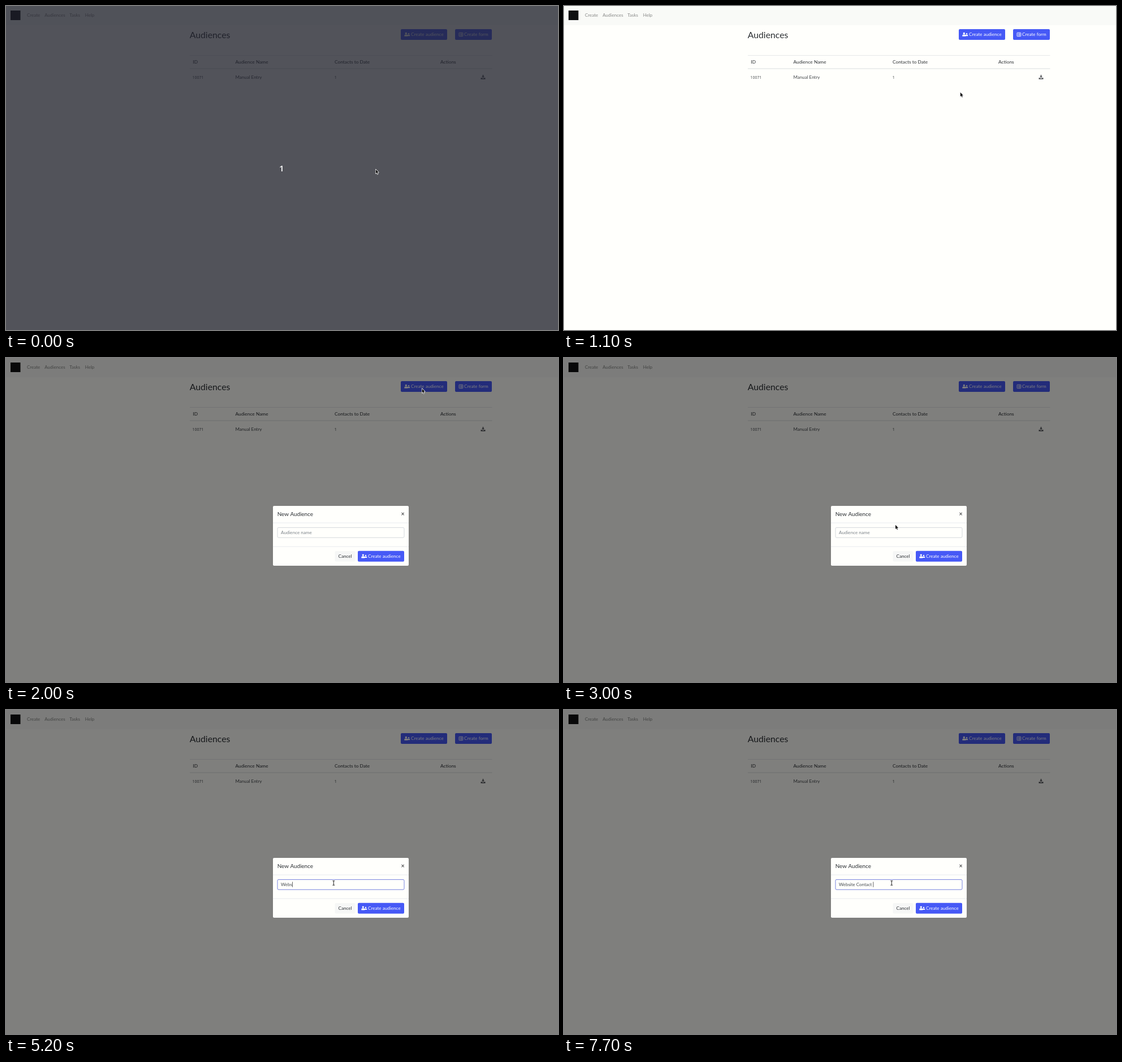
Write an HTML page with a canvas that moves like this. It is 976x574 px and loops after 8000 ms.

```html
<!DOCTYPE html>
<html lang="en">
<head>
<meta charset="utf-8">
<title>Audiences</title>
<style>
html, body { margin: 0; width: 100%; height: 100%; overflow: hidden; background: #fffffc; }
canvas { display: block; width: 976px; height: 574px; }
</style>
</head>
<body>
<canvas id="stage"></canvas>
<script>
const W = 976, H = 574, LOOP = 8000, STEP = 100;
const PAGE = '#fffffc', BLUE = '#4659f6', BLUE_HOVER = '#1b36df';
const INK = '#2b2f33', SOFT = '#44484c';
const SANS = 'Lato, "Open Sans", sans-serif';
const DIGITS = '"Open Sans", "Noto Sans", sans-serif';

const canvas = document.getElementById('stage');
const ctx = canvas.getContext('2d');
const ratio = window.devicePixelRatio || 1;
canvas.width = W * ratio;
canvas.height = H * ratio;

// Cursor path: [start, end, from, to]
const MOVES = [
  [500, 900, [653.7, 289.4], [698, 161]],
  [1000, 1600, [698, 161], [735.6, 54.3]],
  [2300, 3100, [735.6, 54.3], [579.3, 306.5]]
];

// Time at which the typed text grows to each length
const TYPED = 'Website Contact ';
const KEYS = [[4100, 1], [4400, 2], [4700, 3], [5200, 4], [5500, 7], [5700, 8], [6200, 9],
  [6500, 10], [6800, 11], [7100, 13], [7500, 15], [7700, 16]];

function rect(x, y, w, h, color) {
  ctx.fillStyle = color;
  ctx.fillRect(x, y, w, h);
}

function box(x, y, w, h, r, fill, stroke) {
  ctx.beginPath();
  ctx.roundRect(x, y, w, h, r);
  if (fill) { ctx.fillStyle = fill; ctx.fill(); }
  if (stroke) { ctx.strokeStyle = stroke; ctx.lineWidth = 0.8; ctx.stroke(); }
}

function text(str, x, y, size, color = INK, family = SANS, weight = 400) {
  ctx.font = `${weight} ${size}px ${family}`;
  ctx.fillStyle = color;
  ctx.fillText(str, x, y);
}

function poly(points) {
  ctx.beginPath();
  points.forEach(([x, y]) => ctx.lineTo(x, y));
  ctx.closePath();
}

function person(x, y, s) {
  ctx.beginPath();
  ctx.arc(x, y - 1.9 * s, 1.7 * s, 0, 7);
  ctx.fill();
  ctx.beginPath();
  ctx.roundRect(x - 3 * s, y + 0.3 * s, 6 * s, 3.2 * s, [1.8 * s, 1.8 * s, 0.5 * s, 0.5 * s]);
  ctx.fill();
}

function audienceButton(x, y, color) {
  box(x, y, 82, 19, 2, color);
  ctx.fillStyle = '#fff';
  person(x + 9.3, y + 9.3, 1);
  person(x + 14, y + 9.7, 0.75);
  text('Create audience', x + 18, y + 12.4, 8.15, '#fff');
}

function formButton(x, y) {
  box(x, y, 65, 19, 2, BLUE);
  box(x + 6.9, y + 6.3, 7, 6.4, 0.8, null, '#fff');
  for (let i = 0; i < 3; i++) {
    const ly = y + 7.6 + i * 1.6;
    rect(x + 8, ly, 0.9, 0.8, '#fff');
    rect(x + 9.6, ly, 3.3, 0.8, '#fff');
  }
  text('Create form', x + 16, y + 12.4, 8.15, '#fff');
}

function downloadIcon(x, y) {
  ctx.fillStyle = '#505357';
  poly([[x + 3.2, y], [x + 4.8, y], [x + 4.8, y + 2.7], [x + 6.6, y + 2.7],
    [x + 4, y + 5.3], [x + 1.4, y + 2.7], [x + 3.2, y + 2.7]]);
  ctx.fill();
  poly([[x, y + 5.3], [x + 2.2, y + 5.3], [x + 4, y + 6.7], [x + 5.8, y + 5.3],
    [x + 8, y + 5.3], [x + 8, y + 7.8], [x, y + 7.8]]);
  ctx.fill();
}

function drawPage(rowHover, buttonHover) {
  rect(0, 0, W, H, PAGE);
  rect(0, 0, W, 34, '#f9faf7');
  rect(8, 8, 17.5, 17, '#101113');
  [['Create', 37], ['Audiences', 68.3], ['Tasks', 112.3], ['Help', 139.7]]
    .forEach(([s, x]) => text(s, x, 19.4, 8, '#878887'));

  text('Audiences', 324.7, 56.6, 15.8);
  audienceButton(698, 41, buttonHover ? BLUE_HOVER : BLUE);
  formButton(794, 41);

  if (rowHover) rect(325, 111.5, 534.5, 29.5, '#ececea');
  rect(325, 87, 534.5, 0.7, '#dcdfe1');
  rect(325, 110.5, 534.5, 1, '#d9dde0');
  [['ID', 330.3], ['Audience Name', 405.5], ['Contacts to Date', 581], ['Actions', 768]]
    .forEach(([s, x]) => text(s, x, 101.9, 8.35));
  text('10071', 329.6, 128.8, 7, SOFT, DIGITS);
  text('Manual Entry', 405.5, 128.9, 8, SOFT);
  text('1', 580.5, 128.8, 7.8, SOFT, DIGITS);
  downloadIcon(839.5, 122);
}

function drawModal(t) {
  box(472, 262, 240, 106, 2, PAGE);
  text('New Audience', 479.7, 280.4, 9.85);
  text('×', 698.5, 280, 10.5, '#4c4d4e', SANS, 700);
  rect(472, 291.7, 240, 0.7, '#dee2e6');
  rect(472, 333.7, 240, 0.7, '#dee2e6');

  const focus = t >= 3300;
  box(480, 300.4, 224, 17.8, 2, PAGE, focus ? '#5463d8' : '#c9cfd5');
  const key = KEYS.filter(([at]) => t >= at).pop();
  const value = key ? TYPED.slice(0, key[1]) : '';
  if (value) text(value, 486, 312.1, 7.95, '#43494f');
  else text('Audience name', 486, 312.1, 8.1, '#7c838a');
  if (focus) {
    ctx.font = `7.95px ${SANS}`;
    rect(486.2 + ctx.measureText(value).width, 304.4, 0.7, 9.4, '#202326');
  }

  box(581.5, 342, 36, 18.5, 2, '#f6f7f6');
  text('Cancel', 587.6, 354.1, 8.1);
  audienceButton(622, 341.7, BLUE);
}

function cursorAt(t) {
  let pos = MOVES[0][2];
  for (const [start, end, a, b] of MOVES) {
    if (t < start) break;
    const k = Math.min(1, (t - start) / (end - start));
    const e = k * k * (3 - 2 * k);
    pos = a.map((v, i) => v + (b[i] - v) * e);
  }
  return pos;
}

function drawArrow(x, y) {
  poly([[x, y], [x, y + 7.4], [x + 1.7, y + 5.9], [x + 2.9, y + 8.6],
    [x + 4, y + 8.1], [x + 2.8, y + 5.5], [x + 5.1, y + 5.3]]);
  ctx.lineJoin = 'round';
  ctx.strokeStyle = '#fff';
  ctx.lineWidth = 1.4;
  ctx.stroke();
  ctx.fillStyle = '#111';
  ctx.fill();
}

function drawBeam(x, y) {
  rect(x - 0.5, y - 4, 1, 8, '#222');
  rect(x - 2, y - 4.2, 4, 0.9, '#222');
  rect(x - 2, y + 3.3, 4, 0.9, '#222');
}

function draw(t) {
  ctx.setTransform(ratio, 0, 0, ratio, 0, 0);
  const [x, y] = cursorAt(t);
  const modal = t >= 2000;
  const rowHover = !modal && y > 111 && y < 141;
  const buttonHover = !modal && y > 41 && y < 60;
  drawPage(rowHover, buttonHover);

  if (t < 500) {
    rect(0, 0, W, H, 'rgba(28, 30, 40, 0.76)');
    text('1', 483, 292.6, 15, '#fff', DIGITS, 600);
  }
  if (modal) {
    rect(0, 0, W, H, 'rgba(0, 0, 0, 0.5)');
    drawModal(t);
  }
  if (modal && y > 300) drawBeam(x, y);
  else drawArrow(x, y);
}

const began = performance.now();
function tick() {
  const t = (performance.now() - began) % LOOP;
  draw(Math.floor(t / STEP) * STEP);
  requestAnimationFrame(tick);
}
tick();
</script>
</body>
</html>
```
